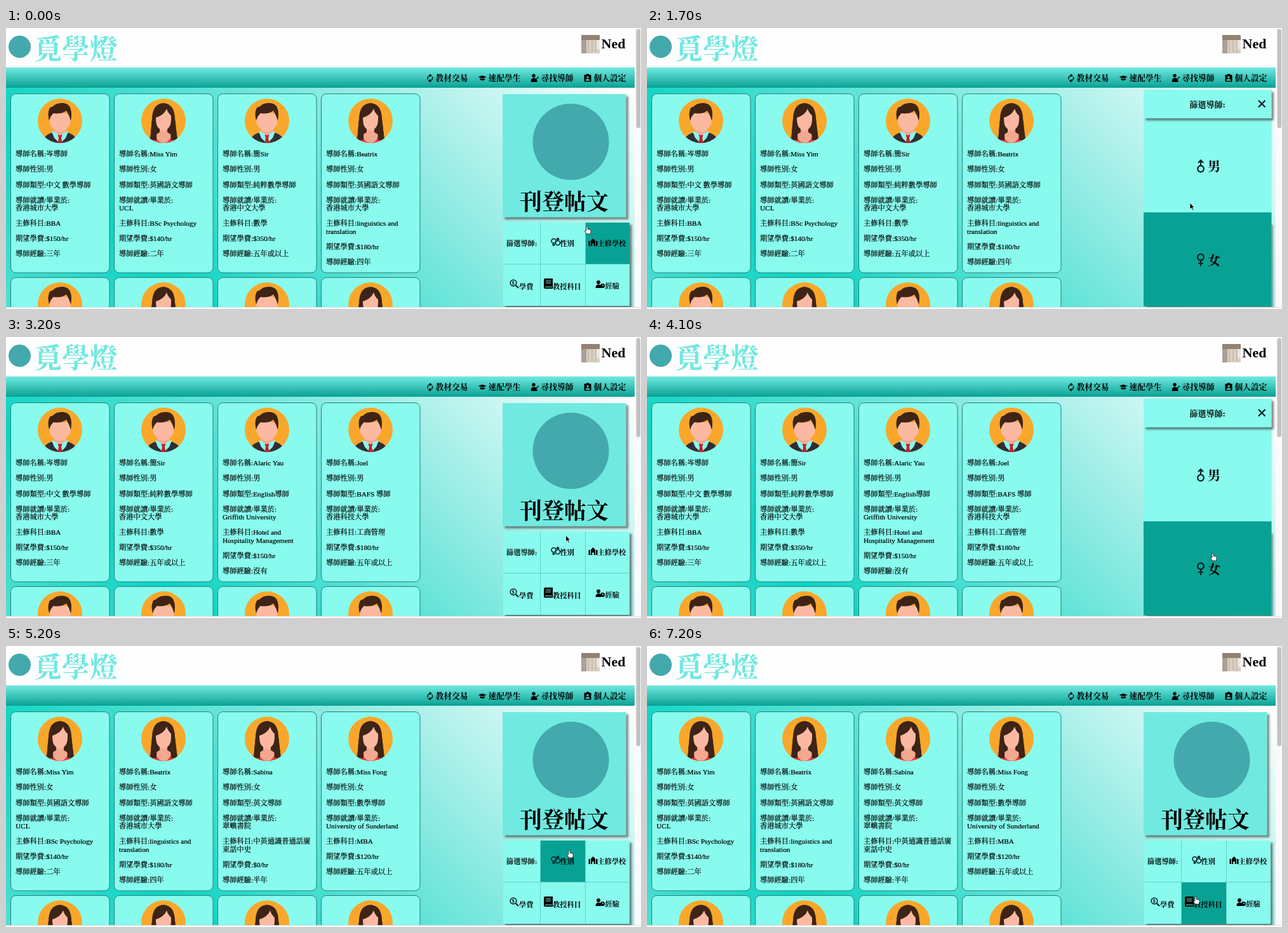
These frames come from a looping animation (1000 by 442 pixels, 7.3 s). An HTML page:

```html
<!DOCTYPE html>
<html lang="zh-HK">
<head>
<meta charset="utf-8">
<title>導師篩選</title>
<style>
html, body { margin: 0; width: 100%; height: 100%; overflow: hidden; background: #fff; }
svg { display: block; width: 100vw; height: 100vh; }
text { font-family: "Liberation Serif", "Noto Serif CJK TC", "Noto Serif CJK JP", "Noto Sans CJK TC", "Noto Sans CJK JP", "Noto Sans CJK", serif; white-space: pre; }
.body { stroke: #000; stroke-width: .22; }
.line { fill: none; stroke: #06201f; stroke-width: 1.6; }
.thick { stroke-width: 2.2; }
.cell { fill: #88fbee; }
.cell.on { fill: #08a295; }
</style>
</head>
<body>
<svg id="stage" viewBox="0 0 1000 442" preserveAspectRatio="none">
  <defs>
    <linearGradient id="bar" x2="0" y2="1">
      <stop stop-color="#72eae1"/><stop offset="1" stop-color="#08a193"/>
    </linearGradient>
    <linearGradient id="wash" gradientUnits="userSpaceOnUse" x1="-25" y1="1159" x2="1015" y2="119">
      <stop stop-color="#fff"/><stop offset=".5" stop-color="#0bd4c2"/><stop offset="1" stop-color="#fff"/>
    </linearGradient>
    <linearGradient id="band" gradientUnits="userSpaceOnUse" x1="234" y1="391" x2="766" y2="-141">
      <stop stop-color="#fff"/><stop offset=".5" stop-color="#0bd4c2"/><stop offset="1" stop-color="#fff"/>
    </linearGradient>
    <filter id="shade" x="-20%" y="-20%" width="150%" height="150%">
      <feDropShadow dx="3.5" dy="3.5" stdDeviation="1.8" flood-color="#333" flood-opacity=".6"/>
    </filter>
    <filter id="soft" x="-30%" y="-30%" width="160%" height="180%">
      <feDropShadow dx="1" dy="4" stdDeviation="4" flood-color="#123" flood-opacity=".45"/>
    </filter>
    <clipPath id="round"><circle r="35"/></clipPath>

    <g id="man">
      <circle r="35" fill="#f9a72b"/>
      <g clip-path="url(#round)">
        <path d="M-28 36Q-27 24-14 19H14Q27 24 28 36Z" fill="#2f2e35"/>
        <path d="M-13 17H13L9 27 0 36-9 27Z" fill="#88fbee"/>
        <path d="M-3.500 22H3.500L2 27 4 36H-4L-2 27Z" fill="#c3202a"/>
        <path d="M-10 6H10V17L0 23-10 17Z" fill="#f3a88f"/>
        <path d="M-17-12H17V0Q16 8 9 14Q0 21-9 14Q-16 8-17 0Z" fill="#fcb9a1"/>
        <path d="M-17 0Q-20-12-17-18Q-16-22-12-22Q-6-29 5-28Q15-27 17-18Q19-11 17 0Q15-8 10-16Q2-10-10-12Q-15-8-17 0Z" fill="#3d2416"/>
      </g>
    </g>
    <g id="woman">
      <circle r="35" fill="#f9a72b"/>
      <g clip-path="url(#round)">
        <path d="M-21 31Q-19 4-17-12Q-14-27 0-28Q14-27 17-12Q19 4 22 31L12 33H-12Z" fill="#3d2416"/>
        <path d="M-27 36Q-25 24-13 21H13Q25 24 27 36Z" fill="#e23c37"/>
        <path d="M-6 9H6V18L13 22Q9 35 0 35Q-9 35-13 22L-6 18Z" fill="#f3a88f"/>
        <path d="M-12-5Q1-9 5-19Q7-12 12-8V2Q11 9 5 14Q0 17-5 14Q-11 9-12 2Z" fill="#fcb9a1"/>
        <path d="M-13-10Q-10 9-11 30L-21 31Q-19 7-17-12ZM13-10Q10 9 12 30L22 31Q19 7 17-12Z" fill="#3d2416"/>
      </g>
    </g>
    <g id="mars" class="line thick"><circle cy="4" r="4.8"/><path d="M0-1V-9M-4-5.500L0-9.500 4-5.500"/></g>
    <g id="venus" class="line thick"><circle cy="-4" r="4.800"/><path d="M0 1V10M-4 5.500H4"/></g>
  </defs>

  <rect width="1000" height="442" fill="#fffefe"/>
  <g id="listing"><rect y="94" width="990" height="345" fill="url(#wash)"/></g>
  <g id="loading">
    <rect y="94" width="1000" height="62" fill="url(#band)"/>
    <rect x="306" y="106" width="45" height="41" rx="20.5" fill="url(#bar)" filter="url(#soft)"/>
    <path class="line" d="M328.500 119.500V126M323 131H334"/>
    <path d="M324 124.500H333L328.500 129Z"/>
    <rect y="156" width="1000" height="183" fill="url(#bar)" filter="url(#soft)"/>
    <rect x="377" y="175.500" width="244.500" height="70" rx="9" stroke="#78918d" stroke-width="1.600"/>
    <rect x="393.500" y="175" width="212" height="139.500" rx="7" fill="#fff" filter="url(#soft)"/>
    <g id="dots" transform="translate(500 244.500)"></g>
  </g>
  <rect id="nav" y="62" width="990" height="32" fill="url(#bar)"/>

  <circle cx="21.500" cy="29.500" r="17.500" fill="#43a9ac"/>
  <text x="44" y="49" font-size="44" font-weight="600" fill="#70e8e0">覓學燈</text>
  <g id="menu">
    <rect x="906" y="11" width="29" height="29" fill="#d9d0c4"/>
    <path d="M906 11h29v8h-29Z" fill="#938270"/>
    <path d="M906 19h8v21h-8Z" fill="#aaa196"/>
    <path d="M917 20v19M923 20v18M929 20v19" stroke="#c0b5a7" stroke-width="1.500"/>
    <path d="M930 19h5v14h-5Z" fill="#eee7dd"/>
    <path class="line" d="M664.500 81A4.200 4.200 0 0 1 668 74.700M671 76.500A4.200 4.200 0 0 1 667.500 83"/>
    <path d="M667 72l4 2.700-4 2.600ZM668.500 80.500l-4 2.600 4 2.700Z"/>
    <path d="M743.500 77l6.500-2.300 7 2.300-7 2.300ZM746.500 79l3.500 1.300 4-1.300v2.600q-4 2-7.500 0Z"/>
    <circle cx="831" cy="75" r="2.700"/>
    <path d="M826.500 85q0-6.500 4.500-6.500 2.500 0 3.500 2l2 2v2.500Z"/>
    <path class="line" d="M833 79l1.800 1.800 4-4"/>
    <rect x="910.500" y="73.500" width="11" height="11" rx="1"/>
    <rect x="914" y="72" width="4" height="3" rx="1"/>
    <circle cx="916" cy="77.500" r="1.700" fill="#4cc9be"/><path d="M912.500 83q0-3 3.500-3t3.500 3Z" fill="#3bbdb2"/>
  </g>

  <g id="tools">
    <rect x="782" y="104" width="194.500" height="193.500" fill="#70eae0" filter="url(#shade)"/>
    <circle cx="889.500" cy="179" r="60" fill="#43a9ac"/>
    <rect x="783" y="306" width="199" height="131" fill="#66cfc5" filter="url(#shade)"/>
    <g id="grid"></g>
    <g class="line"><circle cx="862.500" cy="335" r="3.500"/><path d="M862.500 338.500V343M860 341H865"/><circle cx="869" cy="338" r="3.500"/><path d="M869 334.500V331M866.800 333L869 330.500 871.300 333"/></g>
    <path d="M917.500 335h2.500v8h-2.500ZM929 335h2.500v8h-2.500ZM921 343v-8.500l3.500-3.500 3.500 3.500v8.500h-2.200v-4h-2.600v4Z"/>
    <circle class="line" cx="799" cy="401" r="4.800"/><path class="line thick" d="M803 405l4 4"/>
    <path d="M847 396q0-2 2-2h12v16h-12q-2 0-2-2Z"/><path d="M850 398h8M850 401h8M849 407.300h11" stroke="#88fbee"/>
    <circle cx="933" cy="400" r="3"/><path d="M928.500 409q0-5.500 4.500-5.500 3 0 4 2v3.500Z"/><circle cx="939.500" cy="405.500" r="3.500"/><path d="M939.500 403.500v2h1.800" fill="none" stroke="#88fbee"/>
  </g>

  <g id="panel">
    <rect x="782" y="97" width="201.500" height="341" fill="#88fbee"/>
    <rect id="male" class="cell" x="782" y="142" width="201.500" height="148"/>
    <rect id="female" class="cell" x="782" y="290" width="201.500" height="148"/>
    <rect x="782" y="97" width="201.500" height="45" fill="#88fbee" filter="url(#shade)"/>
    <path class="line thick" d="M963 114l10.500 10.500M973.500 114L963 124.500"/>
    <use href="#mars" x="872" y="217.500"/>
    <use href="#venus" x="872" y="364.500"/>
  </g>

  <g id="scroll">
    <rect x="990.500" width="9.500" height="439" fill="#fafafa"/>
    <rect x="992.500" y="1.500" width="6.500" height="156" rx="3.200" fill="#c1c1c1"/>
  </g>
  <rect y="439" width="1000" height="3" fill="#fff"/>
  <path d="M0 439.500H1000" stroke="#dedede"/>
  <g id="cursor">
    <path id="arrow" d="M0 0V10L2.300 8 4 11.800 5.700 11 4 7.400H7Z" fill="#000" stroke="#fff" stroke-width=".7"/>
    <path id="hand" d="M-1.200 1Q-1.200-.3 0-.3T1.200 1V4.500L5 5.200Q6.500 5.600 6.300 7.500L5.500 12H-.5L-3.600 7.500Q-3.600 6-1.200 7.200Z" fill="#fff" stroke="#222" stroke-width=".9"/>
  </g>
</svg>
<script>
const $ = id => document.getElementById(id);

function add(parent, tag, attrs, content) {
  const el = document.createElementNS('http://www.w3.org/2000/svg', tag);
  for (const key in attrs) el.setAttribute(key, attrs[key]);
  if (content) el.textContent = content;
  parent.append(el);
  return el;
}
const write = (parent, x, y, size, content, weight = 700) =>
  add(parent, 'text', { x, y, 'font-size': size, 'font-weight': weight, class: weight < 600 ? 'body' : '' }, content);

// name, sex, type, school, major, hourly fee, experience
const tutors = [
  ['岑導師', '男', '中文 數學導師', '香港城市大學', 'BBA', 150, '三年'],
  ['Miss Yim', '女', '英國語文導師', 'UCL', 'BSc Psychology', 140, '二年'],
  ['簡Sir', '男', '純粹數學導師', '香港中文大學', '數學', 350, '五年或以上'],
  ['Beatrix', '女', '英國語文導師', '香港城市大學', 'linguistics and|translation', 180, '四年'],
  ['Alaric Yau', '男', 'English導師', 'Griffith University', 'Hotel and|Hospitality Management', 150, '沒有'],
  ['Joel', '男', 'BAFS 導師', '香港科技大學', '工商管理', 180, '五年或以上'],
  ['Sabina', '女', '英文導師', '翠嶼書院', '中英通識普通話廣|東話中史', 0, '半年'],
  ['Miss Fong', '女', '數學導師', 'University of Sunderland', 'MBA', 120, '五年或以上']
];
const lists = { all: [0, 1, 2, 3], men: [0, 2, 4, 5], women: [1, 3, 6, 7] };

function drawCard(parent, x, y, tutor) {
  const [name, sex, type, school, major, fee, years] = tutor;
  const g = add(parent, 'g', { transform: `translate(${x} ${y})` });
  add(g, 'rect', { width: 155.5, height: 281.5, rx: 8, fill: '#88fbee', stroke: '#287f79', 'stroke-width': 1 });
  add(g, 'use', { href: sex === '男' ? '#man' : '#woman', x: 77.5, y: 42.5 });
  const rows = [`名稱:${name}`, `性別:${sex}`, `類型:${type}`, `就讀/畢業於:|${school}`]
    .map(row => '導師' + row)
    .concat(`主修科目:${major}`, `期望學費:$${fee}/hr`, `導師經驗:${years}`);
  let base = 98.8;
  for (const row of rows) {
    row.split('|').forEach((part, i) => {
      if (i) base += 12.5;
      write(g, 7.5, base, 11.25, part, 400);
    });
    base += 24.1;
  }
}

const pages = {};
for (const key in lists) {
  pages[key] = add($('listing'), 'g', {});
  lists[key].forEach((id, i) => {
    for (const y of [103.5, 392.5]) drawCard(pages[key], 7.5 + 163 * i, y, tutors[id]);
  });
}

write($('menu'), 937.5, 32, 22, 'Ned');
['教材交易', '速配學生', '尋找導師', '個人設定'].forEach((label, i) =>
  write($('menu'), 676.5 + 83 * i, 83.3, 12.75, label));

write($('tools'), 809, 285.5, 35, '刊登帖文', 600);
const cells = [
  ['title', 783, 306, 58, '篩選導師:', 788, 343], ['gender', 842, 306, 70, '性別', 872.5, 343],
  ['school', 913, 306, 69, '主修學校', 931.5, 343], ['fee', 783, 372, 58, '學費', 808, 410.5],
  ['subject', 842, 372, 70, '教授科目', 861, 410.5], ['years', 913, 372, 69, '經驗', 943.5, 409.5]
];
for (const [id, x, y, width, label, tx, ty] of cells) {
  add($('grid'), 'rect', { id, class: 'cell', x, y, width, height: 65 });
  write($('grid'), tx, ty, 11.2, label, id === 'title' ? 700 : 600);
}
write($('tools'), 796.8, 403.8, 8, '$');
write($('panel'), 854.5, 124.5, 13, '篩選導師:');
write($('panel'), 883, 224.8, 20, '男', 600);
write($('panel'), 883, 373, 20, '女', 600);

const dots = Array.from({ length: 9 }, () => add($('dots'), 'circle', {}));

// start time, list, panel open, hovered part, loading, arrow pointer
const states = [
  [0, 'all', 0, 'school', 0, 0],
  [500, 'all', 0, 'gender', 0, 0],
  [1100, 'all', 1, 'female', 0, 0],
  [1600, 'all', 1, 'female', 0, 1],
  [1800, 'all', 1, 'male', 0, 0],
  [2200, 'all', 1, '', 1, 1],
  [3000, 'men', 0, '', 0, 1],
  [3300, 'men', 0, 'gender', 0, 0],
  [3600, 'men', 1, 'female', 0, 0],
  [4400, 'men', 1, '', 1, 1],
  [5000, 'women', 0, 'gender', 0, 0],
  [5900, 'women', 0, 'school', 0, 0],
  [6700, 'women', 0, 'years', 0, 0],
  [7000, 'women', 0, 'subject', 0, 0]
];
const path = [
  [0, 915, 312], [200, 914, 313], [700, 888, 325], [1200, 888, 325], [1700, 855, 275],
  [2100, 858, 270], [2600, 872, 289], [3000, 872, 289], [3350, 888, 327], [3700, 888, 327],
  [4100, 891, 340], [4700, 891, 340], [5200, 887, 321], [5500, 887, 321], [6200, 938, 337],
  [6600, 938, 337], [6850, 945, 390], [7200, 864, 394], [7300, 864, 394]
];

function pointerAt(t) {
  const i = path.findIndex(p => p[0] > t);
  const [t0, x0, y0] = path[i - 1], [t1, x1, y1] = path[i];
  const k = (t - t0) / (t1 - t0), e = k * k * (3 - 2 * k);
  return [x0 + (x1 - x0) * e, y0 + (y1 - y0) * e];
}

const show = (el, on) => { el.style.display = on ? '' : 'none'; };

function draw(t) {
  const [, list, open, hover, busy, arrow] = states.filter(s => s[0] <= t).pop();
  show($('listing'), !busy);
  show($('loading'), busy);
  show($('scroll'), !busy);
  show($('panel'), open);
  show($('arrow'), arrow);
  show($('hand'), !arrow);
  for (const key in pages) show(pages[key], key === list);
  document.querySelectorAll('.cell').forEach(c => c.classList.toggle('on', c.id === hover));
  $('nav').setAttribute('width', busy ? 1000 : 990);
  for (const id of ['menu', 'tools', 'panel']) {
    $(id).setAttribute('transform', `translate(${busy ? 10.7 : 0} 0)`);
  }
  $('cursor').setAttribute('transform', `translate(${pointerAt(t)})`);

  // The darkest dot leads clockwise, one place each step.
  const lead = 1 + (t - 2600) / 100;
  dots.forEach((dot, i) => {
    const a = (lead - i) * 40 * Math.PI / 180, k = 1 - i / 8;
    dot.setAttribute('cx', 18.5 * Math.cos(a));
    dot.setAttribute('cy', 18.5 * Math.sin(a));
    dot.setAttribute('r', 2.2 + 2.8 * k);
    dot.setAttribute('fill-opacity', 0.08 + 0.74 * k);
  });
}

const start = performance.now();
function tick() {
  const t = (performance.now() - start) % 7300;
  draw(Math.floor(t / 100) * 100);
  requestAnimationFrame(tick);
}
tick();
</script>
</body>
</html>
```
